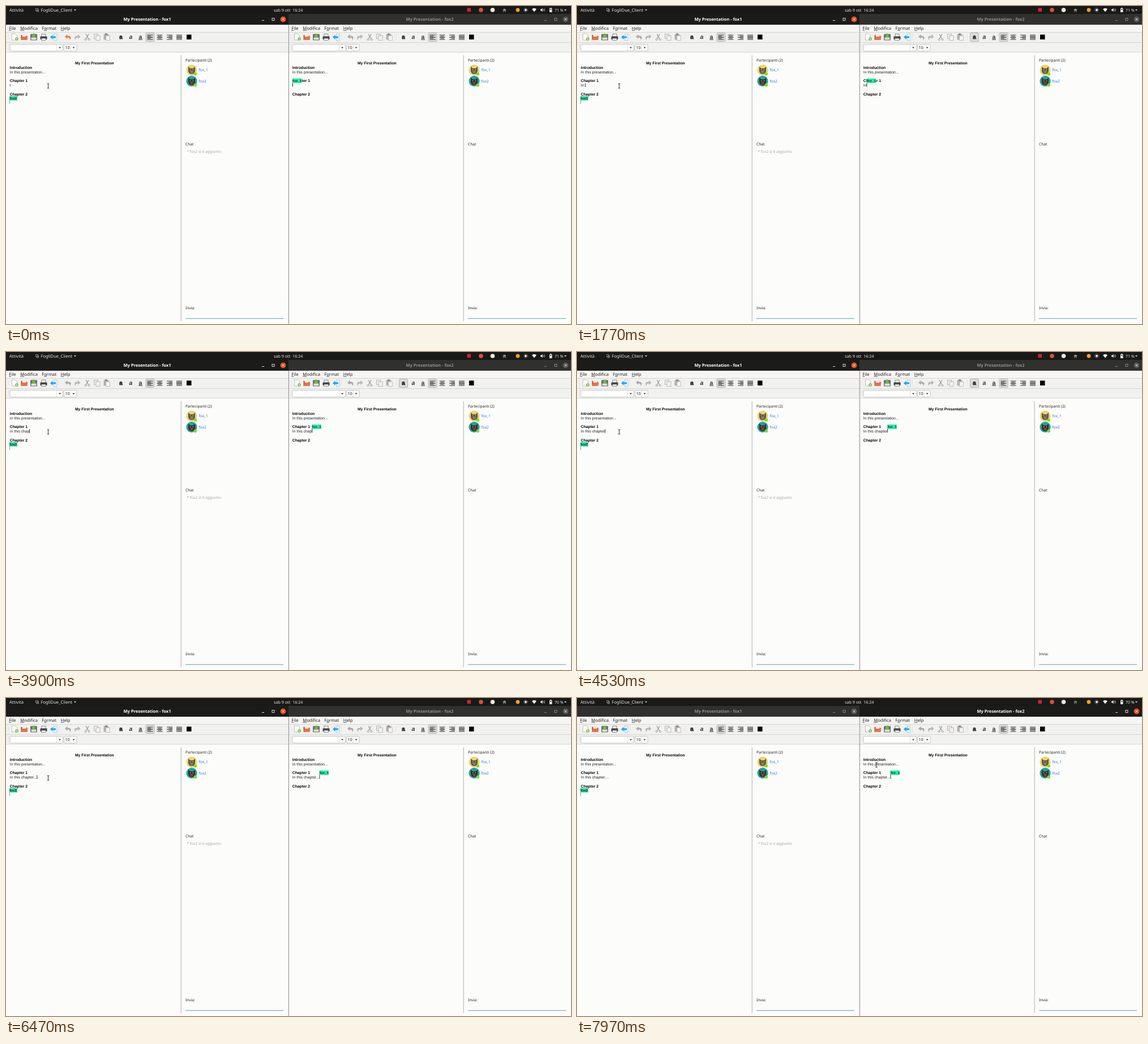
An HTML page for the animation above (8000 ms loop, 998 by 561 pixels).

```html
<!DOCTYPE html>
<html lang="it">
<head>
<meta charset="utf-8">
<title>Shared editor</title>
<style>
html, body { margin: 0; width: 100%; height: 100%; overflow: hidden; background: #fcfcfb; }
svg { display: block; width: 998px; height: 561px; text-rendering: geometricPrecision; }
text { font-family: "Noto Sans", "Open Sans", sans-serif; white-space: pre; }
.doc { font-family: "Liberation Sans", Arial, sans-serif; font-size: 6.75px; }
.b { font-weight: bold; }
.ui { font-size: 7.6px; }
.side { font-size: 6.6px; }
u { text-decoration: underline; }
</style>
</head>
<body>
<svg id="stage" viewBox="0 0 998 561"></svg>
<script>
const LOOP = 8000;
const SPAN = 499;
const LINE = "In this chapter....";
// Time at which each character of LINE appears
const KEYS = [-600, 430, 1500, 1970, 2230, 2500, 2770, 3030, 3370, 3530, 3700, 3870, 4070, 4300, 4530, 4870, 6100, 6470, 6670];
const POINTER = [[6870, 74.5, 141], [7270, 405, 122], [7530, 405, 122], [7900, 529, 118]];
const SETTLED = 70, STYLE_OFF = 4800, FOCUS = 7900;

const text = (x, y, s, cls = "ui", fill = "#222", extra = "") =>
  `<text x="${x}" y="${y}" class="${cls}" fill="${fill}" ${extra}>${s}</text>`;
const rect = (x, y, w, h, fill, extra = "") =>
  `<rect x="${x}" y="${y}" width="${w}" height="${h}" fill="${fill}" ${extra}/>`;
const circle = (x, y, r, fill, extra = "") =>
  `<circle cx="${x}" cy="${y}" r="${r}" fill="${fill}" ${extra}/>`;
const fill = (d, color, extra = "") => `<path d="${d}" fill="${color}" ${extra}/>`;
const line = (d, color, w = 1, extra = "") =>
  `<path d="${d}" fill="none" stroke="${color}" stroke-width="${w}" ${extra}/>`;
const at = (x, y, s) => `<g transform="translate(${x} ${y})">${s}</g>`;
const key = (s) => `<tspan text-decoration="underline">${s}</tspan>`;
const arrow = (x, y, color = "#333") => fill(`M${x - 2} ${y - 1}h4l-2 2.5z`, color);

function topBar() {
  return rect(0, 0, 998, 14, "#191a18") +
    text(6, 9.7, "Attività", "ui", "#e4e4e2") +
    line("M52.5 4.5h4v4h-4zM54.5 6.5h3v3.5h-3z", "#aaa", .7) +
    text(61.5, 9.7, "FogliDue_Client", "ui", "#e4e4e2") + arrow(122, 7, "#ddd") +
    text(473, 9.7, "sab 9 ott  16:24", "ui", "#e4e4e2", 'style="font-size:7.2px"') +
    rect(814.5, 3.5, 6.5, 6.5, "#d3203c") +
    circle(839, 7, 3.8, "#d9503f") + circle(859.5, 7, 3.8, "#ece9dc") +
    line("M880.5 6.5l-2 4M880.5 6.5l2 4M878 8a2.5 2.5 0 1 1 5 0M879.3 6.5a1.3 1.3 0 0 1 2.4 0", "#ddd", .8, 'id="antenna"') +
    circle(904, 7, 3.4, "#f4a024") +
    circle(918, 7, 2, "#eee") + circle(918, 7, 3.3, "none", 'stroke="#eee" stroke-width="1" stroke-dasharray="1 1.6"') +
    fill("M929 5.5q4-3.5 8 0l-4 5z", "#eee") +
    fill("M944 5.7h1.6l2-2v6.6l-2-2H944z", "#eee") +
    line("M949 5.3q1.2 1.7 0 3.4M950.5 4.2q2 2.8 0 5.6", "#ddd", .7) +
    rect(960, 4, 4.5, 7, "#eee") + rect(961.3, 3, 2, 1, "#eee") + rect(961, 5, 2.5, 1.5, "#333") +
    text(969, 9.7, "71 %", "ui", "#e4e4e2", 'id="battery" style="font-size:7px"') +
    arrow(988, 7, "#ddd");
}

function letterIcon(x, style) {
  return text(x, 57.7, "a", "doc b", "#333", `text-anchor="middle" style="font-size:10.5px;${style}"`);
}

function alignIcon(x, anchor) {
  let d = "";
  for (let i = 0; i < 5; i++) {
    const w = anchor === "full" || i % 2 === 0 ? 10 : 6.5;
    const left = { left: 0, full: 0, mid: (10 - w) / 2, right: 10 - w }[anchor];
    d += `M${x - 5 + left} ${51.3 + i * 1.9}h${w}`;
  }
  return line(d, "#333", 1.05);
}

const pressed = (x, extra = "") =>
  rect(x - 7.5, 47.5, 15, 15, "#dcdcda", `stroke="#aaa" stroke-width=".8" rx="1.5" ${extra}`);

const page = (color) => fill("M0 0h6l3 3v8H0z", color, 'stroke="#999" stroke-width=".6"');
const bend = "M4.5 0L0 4l4.5 4V5.5q4-.5 4.5 4.5q4.5-7.5-4.5-7.5z";

function toolbar(id) {
  const newDoc = page("#fff") + circle(8.5, 9, 2.8, "#6bbd35") + line("M8.5 7.4v3.2M6.9 9h3.2", "#fff", .8);
  const open = fill("M0 2h4l1 1.5h6V11H0z", "#c9432b") + rect(2, 0, 7, 5, "#f2eee6") + fill("M0 11l2-6h10l-1.5 6z", "#e9704a");
  const save = rect(0, 1, 12, 11, "#66706d", 'rx="1"') + rect(1.5, 7, 9, 4, "#dfe3df") + fill("M4.5 0h3v3.5h2.5L6 8 2 3.5h2.5z", "#73c332");
  const print = rect(2.5, 0, 7, 5, "#fff", 'stroke="#555" stroke-width=".7"') + rect(0, 4, 12, 5.5, "#444", 'rx="1"') +
    rect(2, 7.5, 8, 3.5, "#eee", 'stroke="#555" stroke-width=".6"');
  const leave = rect(6.5, 0, 5.5, 12, "#e9f5fc", 'stroke="#8ccdf0" stroke-width=".8"') + fill("M0 6l4.5-4v2.6H10v2.8H4.5V10z", "#1ba5ea");
  const cut = line("M2.5 0l4.5 8M7.5 0L3 8", "#909090", 1.1) + line("M2 8a1.5 1.5 0 1 0 .1 0M8 8a1.5 1.5 0 1 0 .1 0", "#909090", 1);
  const copy = rect(0, 0, 7, 8, "#eee", 'stroke="#aaa" stroke-width=".8"') + rect(3.5, 3, 7, 8, "#f3f3f3", 'stroke="#aaa" stroke-width=".8"');
  const paste = rect(0, 1, 9, 10, "#b6b0a8", 'rx="1"') + rect(2.5, 0, 4, 2.2, "#777") + rect(4, 4, 7, 8, "#f3f3f3", 'stroke="#aaa" stroke-width=".7"');
  return at(10.5, 49, newDoc) + at(26.5, 49, open) + at(43, 48.5, save) + at(60.5, 49.5, print) + at(78, 49, leave) +
    at(104, 50, fill(bend, "#aaa", `id="undo${id}"`)) +
    at(131.5, 50, `<g transform="scale(-1 1)">${fill(bend, "#b8b8b8")}</g>`) +
    at(138.5, 49.5, cut) + at(155.5, 49.5, copy) + at(172.5, 48.5, paste) +
    line("M4.5 50v10M93.5 50v10M190.5 50v10M4.5 68v10", "#cfcfcd", 1, 'stroke-dasharray="1 1.5"') +
    pressed(203, `id="bold${id}" visibility="hidden"`) +
    letterIcon(203, "stroke:#333;stroke-width:.7px") + letterIcon(220.5, "font-style:italic") + letterIcon(237.5, "") +
    line("M234 59.3h7", "#333", 1) +
    pressed(254.5) + alignIcon(254.5, "left") + alignIcon(271.5, "mid") + alignIcon(289, "right") + alignIcon(306, "full") +
    rect(319, 50.5, 8.5, 8.5, "#000");
}

function combo(x, w) {
  return rect(x, 67.5, w, 12, "#fff", 'stroke="#b9b9b7" stroke-width=".8" rx="1.5"') +
    line(`M${x + w - 11} 68v11`, "#cfcfcd", .7) + arrow(x + w - 5.5, 73.5);
}

function avatar(y, back, fur, face) {
  return circle(328, y, 9.6, back) +
    fill(`M322 ${y - 6}l3.5 3h5l3.5-3v8q-1 5-6 5t-6-5z`, fur) +
    fill(`M325 ${y + 1}h6l-1 4.5h-4z`, face) +
    circle(325.6, y - .8, .8, "#e8d58a") + circle(330.4, y - .8, .8, "#e8d58a") +
    circle(334.3, y + 7, 2.8, "#82dc1e");
}

function windowFrame(id, name) {
  return rect(0, 14, 499, 19, "#20201e", `id="bar${id}"`) +
    text(249.5, 26.3, "My Presentation - " + name, "b", "#fff", `id="title${id}" text-anchor="middle" style="font-size:7.5px"`) +
    `<g id="buttons${id}" stroke="#ddd">` + line("M452 25.5h4", "inherit", .9, 'style="stroke:inherit"') +
    rect(470, 21.5, 4, 4, "none", 'stroke-width=".9"') + "</g>" +
    circle(489.5, 23.5, 4.9, "#e95420", `id="close${id}"`) + line("M487.7 21.7l3.6 3.6M491.3 21.7l-3.6 3.6", "#fff", .9) +
    rect(0, 33, 499, 48.5, "#f1f1ef") + rect(0, 33, 499, 13, "#f6f5f3") +
    line("M0 46.5h499M0 64.5h499M0 81.5h499", "#cfcfcd", .8) +
    text(5.3, 41.7, key("F") + "ile") + text(25.3, 41.7, key("M") + "odifica") +
    text(63.3, 41.7, "F" + key("o") + "rmat") + text(96.8, 41.7, key("H") + "elp") +
    toolbar(id) + combo(7, 93.5) + combo(102.5, 22.5) + text(104.5, 76.2, "10", "ui", "#222", 'style="font-size:7.2px"') +
    text(122, 102.9, "My First Presentation", "doc b", "#000") +
    text(6.8, 110.7, "Introduction", "doc b", "#000") + text(6.8, 118.5, "In this presentation...", "doc") +
    text(6.8, 134, "Chapter 1", "doc b", "#000") + text(6.8, 142, "", "doc", "#222", `id="typed${id}"`) +
    text(6.8, 157.5, "Chapter 2", "doc b", "#000") +
    line("M309.2 87v469", "#b5b5b5", 1.1) +
    text(317, 98.4, "Partecipanti (2)", "side") +
    avatar(113, "#f0d468", "#5f5748", "#8a7d68") + avatar(132.5, "#1fa3a0", "#3b2b27", "#6b4b3c") +
    text(340.5, 115.4, "fox_1", "side", "#2a76d2") + text(340.5, 134.9, "fox2", "side", "#2a76d2") +
    text(317, 245.7, "Chat", "side") + text(317, 534.5, "Invia:", "side") +
    line("M317 551.3h173", "#5f9fae", 1);
}

const tag = (w, name, color) => rect(0, 0, w, 7.8, color) + text(.3, 5.9, name, "doc b", "#0b3a2a", 'style="font-size:6.2px"');

const stage = document.getElementById("stage");
stage.innerHTML = rect(0, 0, 998, 561, "#fcfcfb") +
  `<g>${windowFrame("L", "fox1")}</g>` + at(SPAN, 0, windowFrame("R", "fox2")) +
  line("M499.4 33v528", "#9a9a98", 1.2) + topBar() +
  text(319.5, 259.3, "* fox2 si è aggiunto", "side", "#a5a5a5") +
  at(6, 158.9, tag(14, "fox2", "#34dba2")) + line("M6.4 166.5v6.5", "#777", .8) +
  rect(0, 136, .8, 7, "#111", 'id="caret"') +
  `<g id="remote">${tag(16.6, "fox_1", "#22f0a6")}${rect(0, 7.5, .9, 7, "#222")}</g>` +
  `<g id="beam">${line("M-1.8 -4h3.6M0 -4v8M-1.8 4h3.6", "#222", .9)}</g>` +
  `<g id="pointer">${fill("M0 0v7.6l1.8-1.6 1.4 3 1.3-.6-1.4-2.9h2.4z", "#222", 'stroke="#fff" stroke-width=".4"')}</g>`;

const el = (id) => document.getElementById(id);
const set = (id, name, value) => el(id).setAttribute(name, value);
const show = (id, on) => set(id, "visibility", on ? "visible" : "hidden");

const pen = document.createElement("canvas").getContext("2d");
pen.font = '67.5px "Liberation Sans", Arial, sans-serif';
const widths = Array.from({ length: LINE.length + 1 }, (_, n) => pen.measureText(LINE.slice(0, n)).width / 10);

function pointerAt(t) {
  let [, x, y] = POINTER[0];
  for (let i = 1; i < POINTER.length; i++) {
    const [t0, x0, y0] = POINTER[i - 1], [t1, x1, y1] = POINTER[i];
    if (t < t0) break;
    const p = Math.min(1, (t - t0) / (t1 - t0)), e = p * p * (3 - 2 * p);
    x = x0 + (x1 - x0) * e;
    y = y0 + (y1 - y0) * e;
  }
  return [x, y];
}

function focusWindow(id, on) {
  set("bar" + id, "fill", on ? "#1b1b19" : "#30302e");
  set("title" + id, "fill", on ? "#fff" : "#908f8b");
  set("buttons" + id, "stroke", on ? "#eee" : "#908f8b");
  set("close" + id, "fill", on ? "#e95420" : "#5a5956");
}

function draw(t) {
  const count = KEYS.filter((k) => k <= t).length;
  const since = t - KEYS[count - 1];
  const typed = LINE.slice(0, count);
  el("typedL").textContent = el("typedR").textContent = typed;

  set("caret", "x", 6.8 + widths[count]);
  show("caret", t < FOCUS && since % 1200 < 600);
  // The remote marker jumps with the insertion, then falls back one character
  const mark = count > 1 && since < 60 ? count : count - 1;
  set("remote", "transform", `translate(${SPAN + 6.8 + widths[mark]} 127.9)`);

  set("undoL", "fill", t < SETTLED ? "#e8822a" : "#aaa");
  show("boldR", t >= SETTLED && t < STYLE_OFF);
  el("battery").textContent = t < STYLE_OFF ? "71 %" : "70 %";
  set("antenna", "stroke", t < FOCUS ? "#ddd" : "#7fd08a");
  focusWindow("L", t < FOCUS);
  focusWindow("R", t >= FOCUS);

  const [x, y] = pointerAt(t);
  const overText = x < 309 || x > 506;
  show("beam", overText);
  show("pointer", !overText);
  set(overText ? "beam" : "pointer", "transform", `translate(${x} ${y})`);
}

const start = performance.now();
function tick() {
  draw((performance.now() - start) % LOOP);
  requestAnimationFrame(tick);
}
tick();
</script>
</body>
</html>
```
